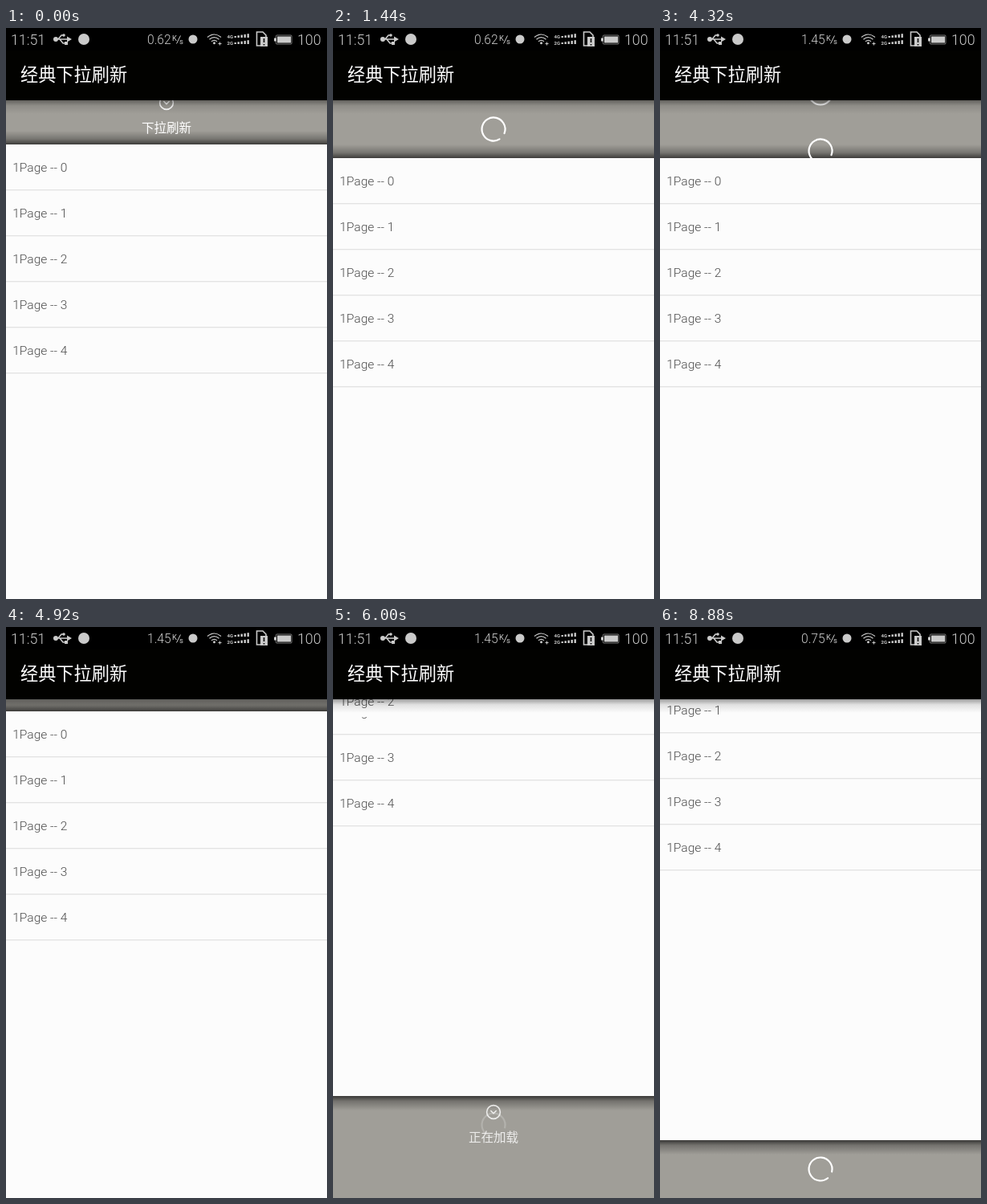
An HTML page that plays this animation: 400 px wide and 711 px high, repeating every 9000 ms.

```html
<!DOCTYPE html>
<html lang="zh">
<head>
<meta charset="utf-8">
<title>经典下拉刷新</title>
<style>
html, body { margin: 0; width: 100%; height: 100%; overflow: hidden; background: #000; }
svg { display: block; width: 100%; height: 100%; }
text { font-family: Roboto, "Noto Sans CJK SC", "Noto Sans CJK", sans-serif; }
.row { font-size: 15.56px; font-weight: 300; fill: #4c4c4c; }
.hint { font-size: 15.56px; fill: #fff; text-anchor: middle; }
.title { font-size: 22.2px; fill: #fff; }
.status { font-size: 17.8px; font-weight: 300; }
.line { fill: none; stroke: #fff; stroke-linecap: round; stroke-linejoin: round; }
</style>
</head>
<body>
<svg viewBox="0 0 400 711">
  <defs>
    <linearGradient id="down" x2="0" y2="1">
      <stop offset="0" stop-color="#000" stop-opacity=".65"/>
      <stop offset=".35" stop-color="#000" stop-opacity=".28"/>
      <stop offset="1" stop-color="#000" stop-opacity="0"/>
    </linearGradient>
    <linearGradient id="up" x2="0" y1="1" y2="0">
      <stop offset="0" stop-color="#000" stop-opacity=".62"/>
      <stop offset=".4" stop-color="#000" stop-opacity=".26"/>
      <stop offset="1" stop-color="#000" stop-opacity="0"/>
    </linearGradient>
    <linearGradient id="bar" x2="0" y2="1">
      <stop offset="0" stop-color="#000" stop-opacity=".38"/>
      <stop offset=".4" stop-color="#000" stop-opacity=".11"/>
      <stop offset="1" stop-color="#000" stop-opacity="0"/>
    </linearGradient>
    <clipPath id="strip"><rect y="90" width="400" height="22"/></clipPath>
  </defs>

  <rect y="90" width="400" height="621" fill="#a09e98"/>
  <g id="shade">
    <rect y="-17" width="400" height="17" fill="url(#up)"/>
    <rect y="621" width="400" height="18" fill="url(#down)"/>
  </g>
  <g id="panels"></g>
  <g id="list"></g>
  <g id="tear" clip-path="url(#strip)"><rect y="90" width="400" height="22" fill="#fcfcfc"/></g>

  <rect y="90" width="400" height="17" fill="url(#bar)"/>
  <rect width="400" height="90" fill="#020200"/>
  <rect width="400" height="28" fill="#000"/>
  <text class="title" x="18" y="66">经典下拉刷新</text>

  <g fill="#cacaca">
    <text class="status" x="6" y="21">11:51</text>
    <text class="status" x="363" y="21">100</text>
    <text id="speed" x="176" y="20" font-size="15.6" font-weight="300"></text>
    <text x="207" y="16" font-size="9.5">K</text>
    <text x="216" y="20" font-size="9.5">s</text>
    <circle cx="62" cy="14" r="3"/>
    <path d="M76 10.5l6 3.5-6 3.5z"/>
    <circle cx="72" cy="9" r="1.8"/>
    <rect x="73" y="17" width="4" height="4"/>
    <circle cx="97" cy="14" r="7"/>
    <circle cx="233" cy="14" r="5.5"/>
    <circle cx="259.5" cy="18.8" r="1.5"/>
    <g font-size="6" font-weight="700">
      <text x="275.5" y="12.5">4G</text>
      <text x="275.5" y="20.5">2G</text>
    </g>
    <g id="signal"></g>
    <rect x="317" y="11" width="9" height="12"/>
    <path d="M321.5 13v5M321.5 20v1.5" stroke="#000" stroke-width="1.5"/>
    <rect x="334" y="12.5" width="3" height="4"/>
    <rect x="338" y="10.5" width="17" height="8"/>
  </g>
  <g fill="none" stroke="#cacaca">
    <path d="M62 14h15M65 14l4-5h3M67 14l4 5h3" stroke-width="1.6"/>
    <path d="M212.5 19.5l5-10"/>
    <path d="M251 11.5q8.5-7 17 0M253.5 14.2q6-5 12 0M256 16.7q3.5-2.8 7 0" stroke-width="1.2"/>
    <path d="M264.5 19.5h4M266.5 17.5v4"/>
    <path d="M317 22h-4.500V5h7.500l4 4v2" stroke-width="1.6"/>
    <rect x="336.5" y="9" width="19.5" height="11" rx="1" stroke-opacity=".6"/>
  </g>
</svg>

<script>
const STEP = 120, LOOP = 9000, PANEL = 72, TURN = 720;
const $ = id => document.getElementById(id);

function add(parent, tag, attrs, text) {
  const el = document.createElementNS(parent.namespaceURI, tag);
  for (const k in attrs) el.setAttribute(k, attrs[k]);
  if (text) el.textContent = text;
  return parent.appendChild(el);
}
const move = (el, y) => el.setAttribute('transform', `translate(0 ${y})`);
const show = (el, a) => el.setAttribute('opacity', a);

function fillList(g) {
  add(g, 'rect', { width: 400, height: 621, fill: '#fcfcfc' });
  for (let i = 0; i < 5; i++) {
    add(g, 'text', { class: 'row', x: 8.2, y: 57 * i + 34 }, `1Page -- ${i}`);
    add(g, 'rect', { y: 57 * i + 56.2, width: 400, height: 1.1, fill: '#dedede' });
  }
  return g;
}

function makePanel(flip) {
  const box = add($('panels'), 'g');
  const hint = add(box, 'g');
  const icon = add(hint, 'g');
  add(icon, 'circle', { class: 'line', r: 8.4, 'stroke-width': 1.6 });
  add(icon, 'path', { class: 'line', d: 'M-3.2 -1.5L0 1.7L3.2 -1.5', 'stroke-width': 1.6 });
  const text = add(hint, 'text', { class: 'hint', x: 200, y: 57 });
  const ringAttrs = { class: 'line', r: 14.5, 'stroke-width': 2.2 };
  const ring = add(box, 'circle', { ...ringAttrs, pathLength: 360, 'stroke-dasharray': '322 38' });
  const done = add(box, 'circle', { ...ringAttrs, cx: 200, cy: 36 - PANEL });
  return { box, hint, icon, text, ring, done, flip };
}

// angle is where the gap points; slide moves the spinner out below
function drawPanel(p, y, { pull, words, fade, angle, slide = 0 }) {
  const turn = fade ? 180 : 180 * Math.min(1, Math.max(0, (pull - PANEL) / 35));
  move(p.box, y);
  p.icon.setAttribute('transform', `translate(200 20) rotate(${turn + p.flip})`);
  p.text.textContent = words[fade ? 2 : pull > PANEL ? 1 : 0];
  show(p.hint, 1 - fade);
  show(p.ring, fade);
  p.ring.setAttribute('transform', `translate(200 ${36 + slide}) rotate(${angle + 19})`);
  move(p.done, slide);
  show(p.done, slide ? 1 : 0);
}

// [step, pull distance]; each value holds until the next step listed
const PULL = [
  [0, 55], [4, 88], [5, 124], [6, 152], [7, 164], [8, 138], [9, 100], [10, 79], [11, 72],
  [39, 69], [40, 44], [41, 15], [42, 0], [43, -20], [45, -54],
  [47, -98], [48, -138], [49, -162], [50, -127], [51, -93], [52, -78], [53, -73], [54, -72]
];
const SLIDE = [[0, 0], [35, 4], [36, 27], [37, 60], [38, 72]];
const SPEED = [[0, '0.62'], [31, '1.45'], [58, '0.75']];
const FADE = [0.2, 0.6, 0.9];
const REFRESH = 8, LOAD = 50;

const at = (table, n) => table.filter(row => row[0] <= n).pop()[1];
const fadeIn = n => n < 0 ? 0 : FADE[n] ?? 1;
const gap = (t, from, angle) => angle + (t - from) * 360 / TURN;

const list = fillList($('list'));
const torn = fillList(add($('tear'), 'g'));
move(torn, 90 - 140);
const head = makePanel(0), foot = makePanel(180);
for (let i = 0; i < 5; i++)
  for (const y of [12, 20])
    add($('signal'), 'rect', { x: 284.5 + 4 * i, y: y - 2 - i * 0.7, width: 2.4, height: 2 + i * 0.7 });

function draw(now) {
  const n = Math.floor(now % LOOP / STEP), t = n * STEP;
  const pull = at(PULL, n), top = 90 + pull;
  move(list, top);
  move($('shade'), top);
  drawPanel(head, top - PANEL, {
    pull, words: ['下拉刷新', '松开刷新', '正在刷新'],
    fade: fadeIn(n - REFRESH), angle: gap(t, 1440, 40), slide: at(SLIDE, n)
  });
  drawPanel(foot, top + 621, {
    pull: -pull, words: ['上拉加载更多', '松开加载更多', '正在加载'],
    fade: fadeIn(n - LOAD), angle: gap(t, 7560, 92)
  });
  show($('tear'), n === LOAD ? 1 : 0);
  $('speed').textContent = at(SPEED, n);
}

let start;
function tick(now) {
  start ??= now;
  draw(now - start);
  requestAnimationFrame(tick);
}
draw(0);
requestAnimationFrame(tick);
</script>
</body>
</html>
```
